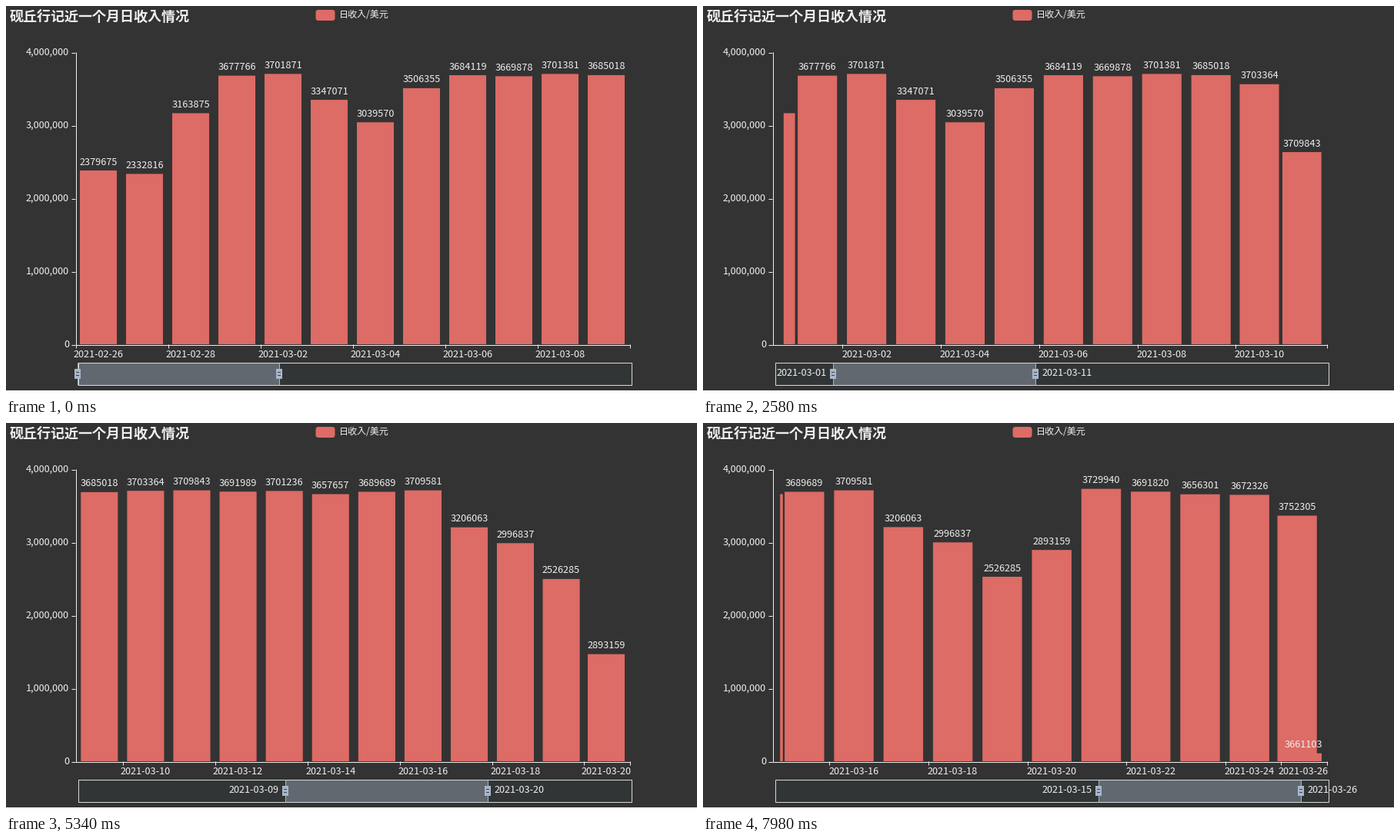
A matplotlib script that plays this animation: 898x506 px, repeating every 8000 ms.

```python
import numpy as np
import matplotlib.pyplot as plt
from matplotlib.animation import FuncAnimation
from matplotlib.patches import FancyBboxPatch, Rectangle

W, H, DPI = 898, 506, 64
PT = 72 / DPI                      # points per pixel
FRAMES, INTERVAL, STEP = 200, 40, 60
FONT = "Noto Sans CJK JP"
BG, RED, INK, STEEL = "#333333", "#dd6b66", "#eeeeee", "#a7b7cc"

LEFT, RIGHT, TOP, BASE = 90, 810, 60, 440
UPDATE_MS, GROW_MS, SHRINK_MS = 600, 2000, 500
SLIDER_Y, SLIDER_H, SPAN = 463.5, 29, 262.7

VALUES = [
    2379675, 2332816, 3163875, 3677766, 3701871, 3347071, 3039570, 3506355,
    3684119, 3669878, 3701381, 3685018, 3703364, 3709843, 3691989, 3701236,
    3657657, 3689689, 3709581, 3206063, 2996837, 2526285, 2893159, 3729940,
    3691820, 3656301, 3672326, 3752305, 3661103,
]
DATES = [f"2021-02-{26 + k}" if k < 3 else f"2021-03-{k - 2:02d}"
         for k in range(len(VALUES))]

# The window's two ends advance in turn; times follow the drag speed.
STEP_NO = [0, 1, 6, 7, 8, 13, 14, 21, 22, 27, 28, 32, 33]
STEP_MS = [1628, 1900, 2758, 2952, 3104, 3870, 4130, 4920, 5600, 6520, 6802,
           7688, 7960]
REFRESHES = [13.5, 27.5]
EVENTS = [(np.interp(n, STEP_NO, STEP_MS), 1 + int(n) // 2, 11 + (int(n) + 1) // 2)
          for n in sorted([*range(34), *REFRESHES])]

DRAG_MS = [1410, 1920, 3240, 4260, 4920, 5340, 6960, 7980]
DRAG_X = [92.5, 121.5, 217.3, 285.3, 358, 363.3, 457.4, 514.4]


def ease(p):
    return 1 - (1 - min(max(p, 0), 1)) ** 3


class Bar:
    """Rectangle (x, width, height) easing from one state to another."""

    def __init__(self, start, end, t0, duration):
        self.start, self.end = np.array(start, float), np.array(end, float)
        self.t0, self.duration = t0, duration

    def at(self, t):
        e = ease((t - self.t0) / self.duration)
        return self.start + (self.end - self.start) * e


def target(k, first, last):
    band = (RIGHT - LEFT) / (last - first + 1)
    return (LEFT + (k - first + 0.1) * band, 0.8 * band,
            VALUES[k] / 4e6 * (BASE - TOP))


def scene(t):
    """Bars and visible window at time t."""
    first, last = 0, 11
    bars = {k: Bar(target(k, 0, 11), target(k, 0, 11), 0, 1) for k in range(12)}
    for when, new_first, new_last in EVENTS:
        if when > t:
            break
        for k in range(first, new_first):
            x, w, h = bars[k].at(when)
            bars[k] = Bar((x, w, h), (x, 0, h), when, SHRINK_MS)
        for k in range(new_first, new_last + 1):
            goal = target(k, new_first, new_last)
            if k in bars:
                bars[k] = Bar(bars[k].at(when), goal, when, UPDATE_MS)
            else:
                bars[k] = Bar((*goal[:2], 0), goal, when, GROW_MS)
        first, last = new_first, new_last
    return bars, first, last


fig = plt.figure(figsize=(W / DPI, H / DPI), dpi=DPI, facecolor="white")
ax = fig.add_axes([0, 0, 1, 1])
ax.set(xlim=(0, W), ylim=(H, 0))
ax.axis("off")


def box(x, y, w, h, color, z=1, **kw):
    return ax.add_patch(Rectangle((x, y), w, h, fc=color, lw=0, zorder=z, **kw))


def line(xs, ys, color=INK, z=3):
    return ax.plot(xs, ys, color=color, lw=PT, zorder=z,
                   solid_capstyle="butt")[0]


def label(x, y, text, ha="center", size=12.7, **kw):
    return ax.text(x, y + 0.36 * size, text, ha=ha, va="baseline", color=INK,
                   family=FONT, size=size * PT, zorder=6, **kw)


def move_label(text, x, y):
    text.set_position((x, y + 0.36 * 12.7))


box(0, 0, W, 500, BG, 0)
label(5, 13, "砚丘行记近一个月日收入情况", "left", 18, weight="bold")
ax.add_patch(FancyBboxPatch((402.5, 5), 25, 14, fc=RED, lw=0,
                            boxstyle="round,pad=0,rounding_size=3.5"))
label(432.5, 11, "日收入/美元", "left", 12)

line([90.5, 90.5], [TOP, BASE + 1])
line([LEFT, RIGHT + 1], [440.5, 440.5])
for i in range(5):
    y = BASE - 95 * i
    line([85, 90], [y + 0.5, y + 0.5])
    label(82, y - 0.5, f"{i * 1000000:,}", "right")

box(93, SLIDER_Y, 719, SLIDER_H, "#323536")
filler = box(93, SLIDER_Y, SPAN, SLIDER_H, "#616870", 2)
ax.add_patch(Rectangle((93.5, SLIDER_Y), 719, SLIDER_H, fc="none",
                       ec="#d5dad9", lw=PT, zorder=3))


class Handle:
    def __init__(self):
        self.stem = line([0, 0], [464, 493], STEEL, 4)
        self.grip = box(0, 471.5, 8, 13, STEEL, 5)
        self.slots = [box(0, y, 4, 1.5, "#3b4048", 5.5) for y in (475.5, 479.5)]

    def move(self, x):
        self.stem.set_xdata([x, x])
        self.grip.set_x(x - 4)
        for slot in self.slots:
            slot.set_x(x - 2)


handles = Handle(), Handle()
range_labels = label(0, 476.5, "", "right"), label(0, 476.5, "", "left")
rects = [box(0, BASE, 0, 0, RED, 2, snap=False) for _ in VALUES]
value_labels = [label(0, 0, str(v)) for v in VALUES]
date_labels = [label(0, 0, d) for d in DATES]
ticks = line([], [])


def draw_bars(t):
    bars, first, last = scene(t)
    tick_x = [RIGHT]
    for k, rect in enumerate(rects):
        shown = first <= k <= last
        rect.set_visible(k in bars)
        value_labels[k].set_visible(shown)
        date_labels[k].set_visible(shown and k % 2 == 0)
        if k not in bars:
            continue
        x, w, h = bars[k].at(t)
        rect.set_bounds(x, BASE - h, w, h)
        move_label(value_labels[k], x + w / 2, BASE - h - 12)
        move_label(date_labels[k], x + w / 2, 452.5)
        if shown and k % 2 == 0:
            tick_x.append(x - w / 8)
    xs = np.floor(np.array(tick_x) + 0.01) + 0.5
    ticks.set_data(np.column_stack([xs, xs, xs * np.nan]).ravel(),
                   np.tile([BASE, BASE + 5, np.nan], len(xs)))
    return first, last


def draw_slider(t, first, last):
    x = np.interp(t, DRAG_MS, DRAG_X)
    filler.set_x(x)
    hovered = 660 <= t < 840 or t >= 1020
    ends = (x, -8.5, first), (x + SPAN, 8.8, last)
    for handle, text, (pos, gap, k) in zip(handles, range_labels, ends):
        handle.move(pos)
        move_label(text, pos + gap, 476.5)
        text.set_text(DATES[k])
        text.set_visible(hovered)


def update(i):
    t = (i * INTERVAL + INTERVAL // 2) // STEP * STEP
    draw_slider(t, *draw_bars(t))
    return []


anim = FuncAnimation(fig, update, frames=FRAMES, interval=INTERVAL,
                     repeat=True, repeat_delay=0, blit=False)
plt.show()
```
